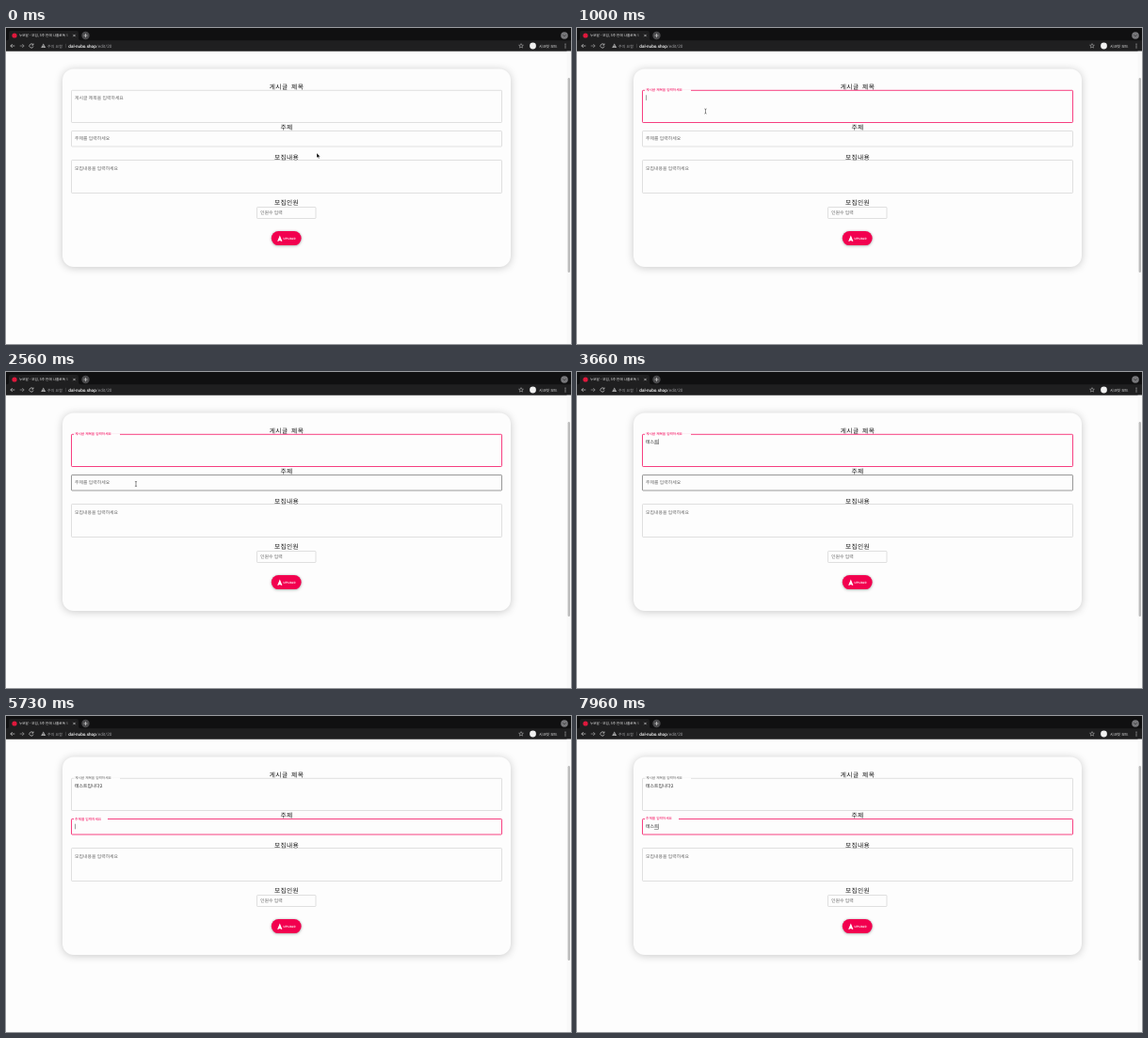
Write an HTML page that moves like this. It is 600 by 336 pixels and loops after 8000 ms.

```html
<!DOCTYPE html>
<html lang="ko">
<head>
<meta charset="utf-8">
<style>
  html, body { margin: 0; width: 100%; height: 100%; overflow: hidden; background: #fdfdfd; }
  svg { display: block; width: 600px; height: 336px; }
  text {
    font-family: "Noto Sans CJK KR", "Noto Sans CJK", sans-serif;
    text-rendering: geometricPrecision;
    white-space: pre;
  }
  .latin { font-family: Roboto, sans-serif; }
  .heading { font-size: 6.7px; font-weight: 500; letter-spacing: .4px; word-spacing: 1.4px; fill: #111; text-anchor: middle; }
  .field { font-size: 4.85px; }
  .card { filter: drop-shadow(0 1.3px 4.2px rgba(0, 0, 0, .21)); }
  .button { filter: drop-shadow(0 .9px .8px rgba(0, 0, 0, .22)) drop-shadow(0 1px 1.6px rgba(0, 0, 0, .2)); }
</style>
</head>
<body>
<svg id="stage" viewBox="0 0 600 336">
  <defs>
    <linearGradient id="tabFade" gradientUnits="userSpaceOnUse" x1="62" x2="69">
      <stop stop-color="#eee"/><stop offset="1" stop-color="#eee" stop-opacity="0"/>
    </linearGradient>
  </defs>

  <!-- Browser bar -->
  <rect width="600" height="14" fill="#101011"/>
  <path d="M0 13.2Q3 13.2 3 11V5Q3 3 5 3H75Q77 3 77 5V11Q77 13.2 80 13.2H600V24.7H0Z" fill="#1f1f20"/>
  <circle cx="9" cy="8" r="2.6" fill="#e0183c"/>
  <text x="14" y="9.3" font-size="3.6" font-weight="500" fill="url(#tabFade)">누보달 - 모임, 5주 만에 나홀로독 5</text>
  <g fill="none" stroke="#e4e4e4" stroke-width=".6">
    <path d="M71.3 6.8l2.4 2.4m0-2.4l-2.4 2.4"/>
    <circle cx="84.5" cy="8" r="4.2" fill="#4a4a4c" stroke="none"/>
    <path d="M82.5 8h4M84.5 6v4"/>
    <circle cx="593" cy="8" r="3.8" fill="#77777a" stroke="none"/>
    <path d="M591.5 7.3l1.5 1.5 1.5-1.5" stroke="#161617"/>
    <path d="M9.3 19H4.8m2-2l-2 2 2 2"/>
    <path d="M24.5 19h4.5" stroke="none"/>
    <path d="M14.7 19h4.5m-2-2l2 2-2 2" stroke="#aaa"/>
    <path d="M28.7 17.8a2.1 2.1 0 1 0 .3 1.7M29 16.4v1.7h-1.7"/>
    <path d="M63.5 16.8v4.4" stroke="#666" stroke-width=".4"/>
    <path d="M547 16.6l.7 1.6 1.7.1-1.3 1.1.4 1.7-1.5-.9-1.5.9.4-1.7-1.3-1.1 1.7-.1z" stroke-width=".4"/>
  </g>
  <path d="M39.7 16.6l2.5 4.4h-5z" fill="#aaa"/>
  <path d="M39.7 18v1.5m0 .4v.5" stroke="#1f1f20" stroke-width=".5"/>
  <text x="44" y="20.5" font-size="4" fill="#a0a0a2">주의 요함</text>
  <text class="latin" x="66.3" y="20.6" font-size="4.6" fill="#97979a"><tspan font-weight="500" fill="#fff">dal-nubo.shop</tspan>/edit/20</text>
  <circle cx="559.5" cy="19" r="3.4" fill="#f1f1f1"/>
  <text x="566" y="20.5" font-size="4" font-weight="500" fill="#eee">시크릿 모드</text>
  <path d="M594 16.7v.9m0 1v.9m0 1v.9" stroke="#eee" stroke-width=".9"/>

  <!-- Page -->
  <rect x="595.5" y="24.7" width="4.5" height="311.3" fill="#f9f9f9"/>
  <rect x="596.6" y="53" width="2.4" height="207" rx="1.2" fill="#bcbcbc"/>
  <rect class="card" x="60" y="43.5" width="476" height="210.5" rx="12" fill="#fdfdfd"/>
  <text class="heading" x="298" y="65">게시글 제목</text>
  <text class="heading" x="298" y="108.4">주제</text>
  <text class="heading" x="298" y="140">모집내용</text>
  <text class="heading" x="298" y="187.6">모집인원</text>
  <g id="fields"></g>
  <rect class="button" x="281.8" y="216.1" width="31.8" height="15" rx="7.5" fill="#f2004f"/>
  <path d="M290.8 220.5l2.5 6.1-.3.3-2.2-1-2.2 1-.3-.3z" fill="#fff"/>
  <text class="latin" x="294.4" y="224.8" font-size="3.1" font-weight="700" letter-spacing=".25" fill="#fff">UPLOAD</text>

  <path id="arrow" d="M0 0V5.1L1.2 4 2 5.8 2.9 5.4 2.1 3.7H3.7Z" fill="#000" stroke="#fff" stroke-width=".35"/>
  <path id="beam" d="M-1.1-2.6Q0-2.6 0-1.9 0-2.6 1.1-2.6M0-2V2M-1.1 2.6Q0 2.6 0 1.9 0 2.6 1.1 2.6" fill="none" stroke="#222" stroke-width=".5"/>
</svg>
<script>
const LOOP = 8000, PINK = '#f50057', PAPER = '#fdfdfd';
const TYPING_START = 3060;

// Each key press: [time, resulting text, is the last syllable still composing]
const titleKeys = [
  [3060, 'ㅌ', 1], [3180, '테', 1], [3290, '텟', 1], [3400, '테스', 1], [3510, '테슽', 1],
  [3620, '테스트', 1], [3780, '테스틍', 1], [3900, '테스트이', 1], [4020, '테스트입', 1],
  [4160, '테스트입ㄴ', 1], [4300, '테스트입니', 1], [4420, '테스트입닏', 1],
  [4540, '테스트입니다', 1], [4900, '테스트입니다2', 0]
];
const topicKeys = [
  [6000, 'ㅌ', 1], [6120, '테', 1], [6240, '텟', 1], [6360, '테스', 1], [6480, '테슨', 1],
  [6590, '테스니', 1], [6700, '테스님', 1], [7080, '테스니', 1], [7230, '테스ㄴ', 1],
  [7380, '테스', 0], [7600, '테스ㅌ', 1], [7750, '테스트', 1]
];

const fields = [
  { x: 69.5, y: 66.3, w: 457, h: 34.2, textY: 74, notch: 121, hint: '게시글 제목을 입력하세요',
    focus: 720, blur: 5600, keys: titleKeys },
  { x: 69.5, y: 109.5, w: 457, h: 16.5, textY: 117.4, notch: 108, hint: '주제를 입력하세요',
    focus: 5600, blur: LOOP, keys: topicKeys },
  { x: 69.5, y: 140.5, w: 457, h: 35, textY: 149, hint: '모집내용을 입력하세요' },
  { x: 266.5, y: 190.5, w: 62.5, h: 12, textY: 196.2, hint: '인원수 입력' }
];

const byId = id => document.getElementById(id);
const clamp = v => Math.max(0, Math.min(1, v));
const mix = (a, b, p) => a + (b - a) * p;
const easeOut = p => 1 - (1 - p) ** 3;
const smooth = p => p * p * (3 - 2 * p);

function set(el, attrs) {
  for (const name in attrs) el.setAttribute(name, attrs[name]);
  return el;
}

function add(tag, attrs) {
  const el = document.createElementNS('http://www.w3.org/2000/svg', tag);
  return byId('fields').appendChild(set(el, attrs));
}

for (const f of fields) {
  f.box = add('rect', { x: f.x, y: f.y, width: f.w, height: f.h, rx: .8, fill: 'none' });
  f.gap = add('rect', { x: f.x + 2.5, y: f.y - 1, height: 2, width: 0, fill: PAPER });
  f.label = add('text', { class: 'field' });
  f.label.textContent = f.hint;
  f.value = add('text', { class: 'field', x: f.x + 3.6, y: f.textY + 1.7, fill: '#222' });
  f.underline = add('rect', { y: f.textY + 2.6, height: .4, fill: '#222' });
  f.caret = add('rect', { y: f.textY - 2.7, width: .4, height: 5.6, fill: '#111' });
}

function mouseAt(t) {
  const first = smooth(clamp((t - 60) / 600));
  const second = smooth(clamp((t - 1900) / 450));
  return { x: mix(330, 136.5, first) + 1.5 * second, y: mix(133, 88.5, first) + 30.5 * second };
}

function drawField(f, t, mouse) {
  const focused = t >= f.focus && t < f.blur;
  const hovered = mouse.x > f.x && mouse.x < f.x + f.w && mouse.y > f.y && mouse.y < f.y + f.h;
  const lift = f.focus ? easeOut(clamp((t - f.focus) / 200)) : 0;
  const scale = mix(1, .75, lift);
  const labelY = mix(f.textY + 1.7, f.y + .8, lift);

  set(f.box, {
    stroke: focused ? PINK : hovered ? '#333' : '#c0c0c0',
    'stroke-width': focused ? .75 : .5
  });
  set(f.gap, { width: f.notch ? (f.notch - f.x - 2.5) * clamp((t - f.focus) / 100) : 0 });
  set(f.label, {
    transform: `translate(${f.x + 3.6} ${labelY}) scale(${scale})`,
    fill: focused ? PINK : '#666'
  });

  const pressed = (f.keys || []).filter(key => key[0] <= t);
  const [time, text, composing] = pressed.pop() || [f.focus, '', 0];
  f.value.textContent = text;
  const end = f.x + 3.6 + (text ? f.value.getComputedTextLength() : 0);
  set(f.underline, { x: end - 4.4, width: focused && composing ? 4.3 : 0 });
  set(f.caret, { x: end, opacity: focused && (t - time) % 1000 < 500 ? 1 : 0 });
  return hovered;
}

function draw(t) {
  const mouse = mouseAt(t);
  const overField = fields.map(f => drawField(f, t, mouse)).some(Boolean);
  const transform = `translate(${mouse.x} ${mouse.y})`;
  const visible = t < TYPING_START;
  set(byId('arrow'), { transform, opacity: visible && !overField ? 1 : 0 });
  set(byId('beam'), { transform, opacity: visible && overField ? 1 : 0 });
}

const start = performance.now();
function tick() {
  draw((performance.now() - start) % LOOP);
  requestAnimationFrame(tick);
}
tick();
</script>
</body>
</html>
```
